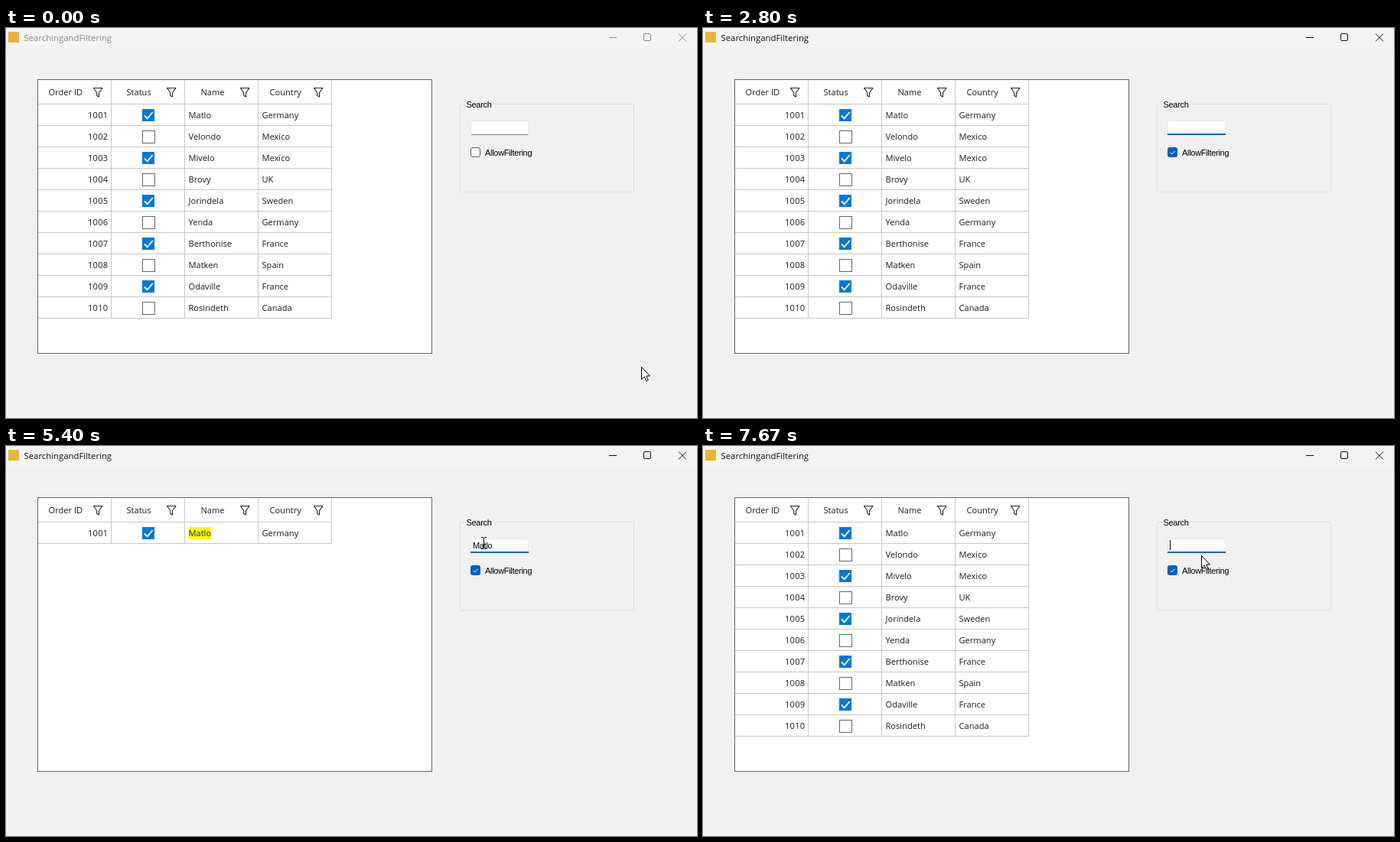
Write an HTML page that moves like this. It is 903x510 px and loops after 8000 ms.

```html
<!DOCTYPE html>
<html lang="en">
<head>
<meta charset="utf-8">
<title>SearchingandFiltering</title>
<style>
  html, body { margin: 0; width: 100%; height: 100%; overflow: hidden; background: #f0f0f0; }
  svg { display: block; width: 100vw; height: 100vh; }
  text { white-space: pre; }
  .grid { font: 11.1px "Open Sans", sans-serif; fill: #1c1c1c; }
  .id { letter-spacing: .3px; }
  .title { font: 11.35px "Open Sans", sans-serif; }
  .form { font: 11px "Liberation Sans", sans-serif; letter-spacing: -.3px; fill: #000; }
</style>
</head>
<body>
<svg id="stage" viewBox="0 0 903 510"></svg>
<script>
const LOOP = 8000, TICK = 1000 / 15;
const QUERY = "Matlo";
const rows = [
  ["Matlo", "Germany"], ["Velondo", "Mexico"], ["Mivelo", "Mexico"], ["Brovy", "UK"],
  ["Jorindela", "Sweden"], ["Yenda", "Germany"], ["Berthonise", "France"],
  ["Matken", "Spain"], ["Odaville", "France"], ["Rosindeth", "Canada"]
].map(([name, country], i) => ({ id: 1001 + i, checked: i % 2 === 0, name, country }));

// Typed length by time
const typing = [[0, 0], [2870, 1], [3200, 2], [3400, 3], [4270, 4], [4400, 5],
  [6870, 4], [7070, 3], [7200, 2], [7400, 1], [7670, 0]];
const caretOn = [[2270, 2800], [2870, 3930], [4270, 4930], [5460, 6530], [6870, LOOP]];
const pointerHidden = [2800, 5260];
// Pointer path: time, x, y, eased
const path = [[0, 830, 443], [733, 611, 168, 1], [933, 611, 168], [1000, 611, 167],
  [1600, 611, 167], [1867, 616, 134, 1], [5200, 616, 134], [5400, 624, 127],
  [5667, 151, 113, 1], [5933, 610, 143, 1], [6067, 649, 160], [6200, 649, 160],
  [6267, 652, 157], [6333, 651, 143], [LOOP, 651, 143]];

const within = (t, [from, to]) => t >= from && t < to;
const ctx = document.createElement("canvas").getContext("2d");
function measure(font, text, spacing = 0) {
  ctx.font = font;
  return ctx.measureText(text).width + spacing * text.length;
}
const gridWidth = s => measure('11.1px "Open Sans", sans-serif', s);
const formWidth = s => measure('11px "Liberation Sans", sans-serif', s, -.3);

const rect = (x, y, w, h, fill, extra = "") =>
  `<rect x="${x}" y="${y}" width="${w}" height="${h}" fill="${fill}" ${extra}/>`;
const line = (d, stroke, extra = "") => `<path d="${d}" fill="none" stroke="${stroke}" ${extra}/>`;
const label = (x, y, text, cls, extra = "") =>
  `<text x="${x}" y="${y}" class="${cls}" ${extra}>${text}</text>`;

function pointerAt(t) {
  const now = Math.floor((t + 4) / TICK) * TICK;
  const i = Math.max(1, path.findIndex(p => p[0] >= now));
  const [t0, x0, y0] = path[i - 1], [t1, x1, y1, eased] = path[i];
  let k = (now - t0) / (t1 - t0);
  if (eased) k = k * k * (3 - 2 * k);
  return { x: Math.round(x0 + (x1 - x0) * k), y: Math.round(y0 + (y1 - y0) * k) };
}

function titleBar(active) {
  const ink = active ? "#111" : "#8a8a8a";
  return rect(0, 0, 903, 28, "#f3f3f3") + rect(3, 5, 14, 14, "#e9b43c") +
    label(23.5, 17, "SearchingandFiltering", "title", `fill="${ink}"`) +
    line("M788 12.5h10M879 7.5l10 10m0-10l-10 10", ink) +
    rect(833.5, 7.5, 9, 9, "none", `rx="1.5" stroke="${ink}"`);
}

function gridCheck(y, checked) {
  return checked
    ? rect(178, y, 16, 16, "#0078d7") + line(`M181 ${y + 8.5}l3.7 3.8l7-8.3`, "#fff", 'stroke-width="1.8"')
    : rect(178.5, y + .5, 16, 16, "#fff", 'stroke="#666"');
}

function cellText(x, y, text, query) {
  const at = query ? text.toLowerCase().indexOf(query.toLowerCase()) : -1;
  const mark = at < 0 ? "" : rect(x + gridWidth(text.slice(0, at)), y - 12,
    gridWidth(text.slice(at, at + query.length)), 16, "#ff0");
  return mark + label(x, y, text, "grid");
}

function grid(query) {
  const q = query.toLowerCase();
  const shown = rows.filter(r => `${r.id}|${r.name}|${r.country}`.toLowerCase().includes(q));
  let out = rect(41.5, 67.5, 515, 358, "#fff", 'stroke="#646464"');
  [["Order ID", 55.5], ["Status", 157.5], ["Name", 254.5], ["Country", 344.5]].forEach(([text, x], i) => {
    const right = 137.5 + 96 * i;
    out += label(x, 88, text, "grid") +
      line(`M${right - 23} 78.5h11.5l-4.5 6v5.5l-2.8-1.6v-3.9z`, "#222", 'stroke-width="1.1" stroke-linejoin="round"') +
      line(`M${right} 68V${100 + 28 * shown.length}`, "#c8c8c8");
  });
  out += line("M42 99.5H426", "#c8c8c8");
  shown.forEach((r, i) => {
    const y = 118 + 28 * i;
    out += line(`M42 ${y + 9.5}H426`, "#c8c8c8") +
      label(133.5, y, r.id, "grid id", 'text-anchor="end"') + gridCheck(y - 12, r.checked) +
      cellText(238.5, y, r.name, query) + cellText(334.5, y, r.country, query);
  });
  return out;
}

function searchPanel(t, query, hover) {
  const focused = t >= 2130, checked = t >= 1600, pressed = within(t, [1470, 1600]);
  let out = line("M600 99.5H593.5V214.5H820.5V99.5H637", "#dcdcdc") + label(601.5, 104, "Search", "form") +
    rect(607.5, 121.5, 75, 18, "#fff", 'rx="1.5" stroke="#e8e8e8"') +
    (focused ? rect(607, 138, 76, 2, "#0067b8") : rect(608, 139, 74, 1, "#868686")) +
    label(610, 134, query, "form") + label(626, 167, "AllowFiltering", "form");
  if (checked) {
    out += rect(607, 156, 13, 13, hover ? "#196ebf" : "#005fb8", 'rx="3"') +
      line("M610.5 162.7l2.2 2.2l4-4.2", "#fff");
  } else {
    out += rect(607.5, 156.5, 12, 12, pressed ? "#dfdfdf" : "#f5f5f5",
      `rx="2.5" stroke="${pressed ? "#bdbdbd" : "#626262"}"`);
  }
  if (caretOn.some(span => within(t, span)))
    out += rect(Math.round(610 + formWidth(query)), 123, 1, 13, "#000");
  return out;
}

function pointer({ x, y }, overText) {
  const shape = overText
    ? line("M-3 -7.5h2.5l1 1l1-1h2.5M.5 -6.5v13M-3 7.5h2.5l1-1l1 1h2.5", "#000")
    : '<path d="M.5 .5V16.5L4.2 13L6.8 18.6L9.2 17.5L6.7 12H11.5Z" fill="#fff" stroke="#000"/>';
  return `<g transform="translate(${x} ${y})">${shape}</g>`;
}

function scene(t) {
  const query = QUERY.slice(0, typing.filter(k => k[0] <= t).pop()[1]);
  const p = pointerAt(t), visible = !within(t, pointerHidden);
  const inside = (x0, y0, x1, y1) => visible && p.x >= x0 && p.x < x1 && p.y >= y0 && p.y < y1;
  return rect(0, 0, 903, 510, "#f0f0f0") + titleBar(t >= 1470) + grid(query) +
    searchPanel(t, query, inside(607, 155, 688, 170)) +
    (visible ? pointer(p, inside(607, 121, 683, 140)) : "");
}

const stage = document.getElementById("stage");
const start = performance.now();
let last = "";
function frame() {
  const markup = scene((performance.now() - start) % LOOP);
  if (markup !== last) stage.innerHTML = last = markup;
  requestAnimationFrame(frame);
}
frame();
</script>
</body>
</html>
```
